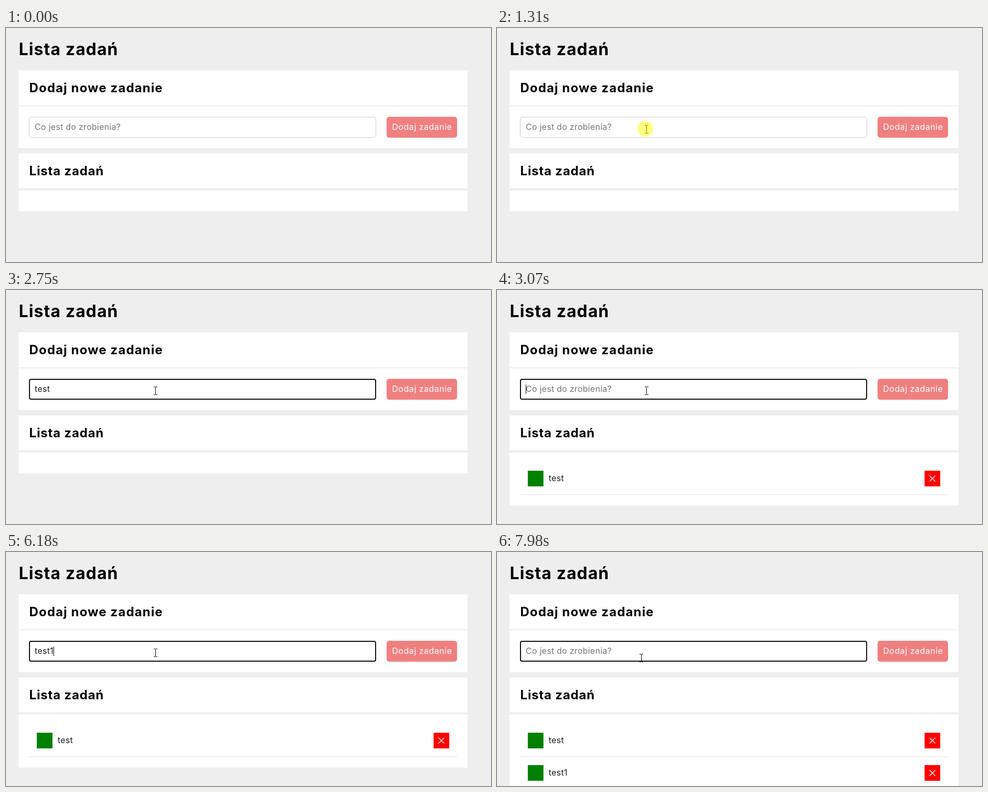
An HTML page that plays this animation: 929x448 px, repeating every 8000 ms.

```html
<!DOCTYPE html>
<html lang="pl">
<head>
<meta charset="utf-8">
<title>Lista zadań</title>
<style>
  html, body { margin: 0; width: 100%; height: 100%; overflow: hidden; background: #eee; }
  svg { display: block; width: 929px; height: 448px; }
  text { font: 16px Inter, "Open Sans", sans-serif; letter-spacing: .018em; fill: #1c1c1c; white-space: pre; }
  .title, .head { font-weight: 700; letter-spacing: .035em; fill: #000; }
  .title { font-size: 32px; }
  .head { font-size: 24px; }
  .wide { letter-spacing: .049em; }
  .hint { fill: #757575; }
  .label { fill: #fff; letter-spacing: .035em; }
  .panel { fill: #fff; }
  .line { fill: #eee; }
</style>
</head>
<body>
<svg viewBox="0 0 929 448">
  <rect width="929" height="448" fill="#eee"/>
  <text class="title" x="24.5" y="52">Lista zadań</text>

  <rect class="panel" x="24" y="81" width="860" height="149"/>
  <rect class="line" x="24" y="148" width="860" height="2"/>
  <text class="head wide" x="44.5" y="123">Dodaj nowe zadanie</text>
  <rect id="idle" x="44.5" y="170.5" width="664" height="39" rx="4.5" fill="#fff" stroke="#ccc"/>
  <rect id="focus" x="45" y="171" width="663" height="38" rx="3" fill="#fff" stroke="#101010" stroke-width="2"/>
  <rect x="729" y="170" width="135" height="40" rx="5" fill="#f08080"/>
  <text class="label" x="739.5" y="195">Dodaj zadanie</text>

  <rect class="panel" x="24" y="240" width="860" height="67"/>
  <text class="head" x="44.5" y="282">Lista zadań</text>
  <rect id="list" class="panel" x="24" y="311" width="860" height="40"/>
  <g id="rows"></g>

  <text id="hint" class="hint" x="55" y="195">Co jest do zrobienia?</text>
  <text id="typed" x="55" y="195"></text>
  <rect id="caret" y="181" width="1" height="18"/>
  <g id="pointer">
    <path id="arrow" d="M.5.5V17l4-4 2.5 5.5 2.5-1-2.5-5.3h5z" fill="#fff" stroke="#000"/>
    <path id="beam" d="M-3-7.5h3m1 0h3M.5-7v14M-3 7.5h3m1 0h3" fill="none" stroke="#000"/>
  </g>
  <circle id="click" cx="284" cy="193" r="15" fill="#ff0" opacity=".5"/>
</svg>
<script>
  const LOOP = 8000, PRESS = 1310, FOCUS = 1390, BLINK = 500, ROW = 62;

  // Each character lands at its key time; a line break adds the task.
  const SCRIPT = 'test\ntest1\n';
  const KEYS = [1880, 1930, 2180, 2250, 3070, 4120, 4240, 4920, 4990, 6180, 6480];

  const ENTER = { from: 480, to: 1240, moves: 12, x: 773, y: 438 };
  const STOPS = [
    { at: ENTER.to, x: 286, y: 194 },
    { at: FOCUS, x: 286, y: 193 },
    { at: 7730, x: 288, y: 189 },
    { at: 7980, x: 276, y: 203 }
  ];

  const $ = id => document.getElementById(id);
  const show = (id, on) => $(id).setAttribute('visibility', on ? 'visible' : 'hidden');

  const rowMarkup = (name, i) => `
    <g id="row${i}" transform="translate(0 ${i * ROW})">
      <rect x="59" y="346" width="30" height="30" fill="green"/>
      <text x="99" y="366">${name}</text>
      <rect x="819" y="346" width="30" height="30" fill="red"/>
      <path d="M828.5 355.5l11 11m0-11l-11 11" stroke="#fff" stroke-width="1.4"/>
      <rect class="line" x="44" y="391" width="820" height="2"/>
    </g>`;
  const names = SCRIPT.trim().split('\n');
  $('rows').innerHTML = names.map(rowMarkup).join('');

  // The pointer sweeps in along a bent path, slowing towards the field.
  function pointerAt(t) {
    if (t >= ENTER.to) return STOPS.filter(stop => stop.at <= t).pop();
    const step = Math.floor((t - ENTER.from) / (ENTER.to - ENTER.from) * ENTER.moves);
    const left = 1 - step / ENTER.moves;
    const [end] = STOPS;
    return {
      x: Math.round(end.x + (ENTER.x - end.x) * left ** 2),
      y: Math.round(end.y + (ENTER.y - end.y) * left ** 1.2)
    };
  }

  function drawForm(t) {
    const pressed = KEYS.filter(key => key <= t);
    const tasks = SCRIPT.slice(0, pressed.length).split('\n');
    const text = tasks.pop();
    const focused = t >= FOCUS;
    const sinceKey = t - (pressed.pop() || FOCUS);

    show('idle', !focused);
    show('focus', focused);
    show('hint', !text);
    $('typed').textContent = text;
    $('caret').setAttribute('x', 55 + Math.round($('typed').getComputedTextLength()));
    show('caret', focused && sinceKey % (2 * BLINK) < BLINK);
    $('list').setAttribute('height', 40 + ROW * tasks.length);
    names.forEach((name, i) => show('row' + i, i < tasks.length));
  }

  function drawPointer(t) {
    const visible = t >= ENTER.from;
    const { x, y } = pointerAt(Math.max(t, ENTER.from));
    const inField = y < 210;
    $('pointer').setAttribute('transform', `translate(${x} ${y})`);
    show('arrow', visible && !inField);
    show('beam', visible && inField);
    show('click', t >= PRESS && t < FOCUS);
  }

  const start = performance.now();
  function tick() {
    const t = (performance.now() - start) % LOOP;
    drawForm(t);
    drawPointer(t);
    requestAnimationFrame(tick);
  }
  tick();
</script>
</body>
</html>
```
